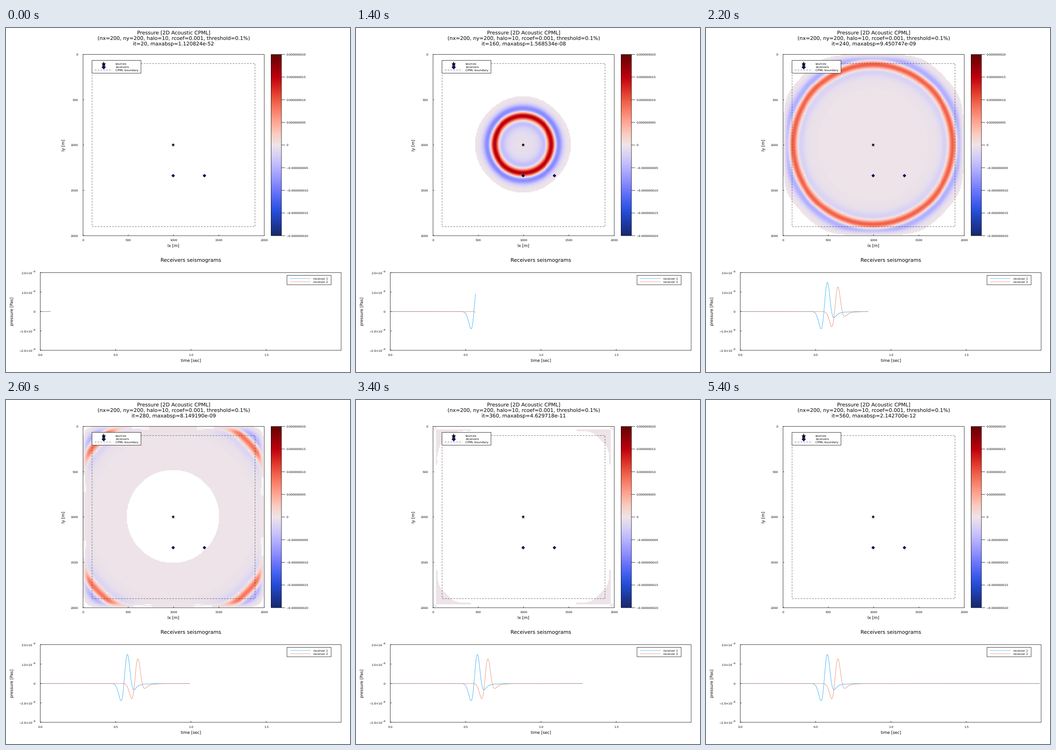
A matplotlib script for the animation above (5600 ms loop, 748 by 749 pixels).

```python
import numpy as np
import matplotlib.pyplot as plt
from matplotlib.animation import FuncAnimation
from matplotlib.colors import LinearSegmentedColormap
from matplotlib.patches import Rectangle

W, H, DPI = 748, 749, 100
PX = 72 / DPI
plt.rcParams.update({"font.family": "DejaVu Sans", "text.hinting": "none"})

# Acoustic wave equation on a square grid with CPML edges
N, HALO, VEL, FREQ, RCOEF = 200, 10, 2000.0, 10.0, 0.001
SIZE, T0 = 2000.0, 0.4
DX = SIZE / (N - 1)
DT = DX / (np.sqrt(2) * VEL)
STEP, FRAMES = 20, 28
SRC, FAR = 99, 133
CLIM, CUT = 2e-8, 2e-11


def damping(pos):
    """CPML coefficients (a, b) at grid positions, as a column."""
    d = np.maximum(np.maximum(HALO - pos, pos - (N - 1 - HALO)), 0) / HALO
    damp = -3 * VEL * np.log(RCOEF) / (2 * HALO * DX) * d ** 2
    alpha = np.pi * FREQ * (1 - d)
    b = np.exp(-(damp + alpha) * DT)
    a = damp * (b - 1) / (damp + alpha)
    return a[:, None], b[:, None]


A_HALF, B_HALF = damping(np.arange(N - 1) + 0.5)
A_NODE, B_NODE = damping(np.arange(1, N - 1) * 1.0)


def second_diff(p, psi, xi):
    """Damped second derivative along the first axis."""
    grad = np.diff(p, axis=0) / DX
    psi *= B_HALF
    psi += A_HALF * grad
    curve = np.diff(grad + psi, axis=0) / DX
    xi *= B_NODE
    xi += A_NODE * curve
    return (curve + xi)[:, 1:-1]


def ricker(t):
    x = (np.pi * FREQ * (t - T0)) ** 2
    return (1 - 2 * x) * np.exp(-x)


def simulate():
    old, cur = np.zeros((N, N)), np.zeros((N, N))
    mem_x, mem_y = ([np.zeros((N - 1, N)), np.zeros((N - 2, N))] for _ in range(2))
    inner = np.s_[1:-1, 1:-1]
    snaps, traces = [], []
    for n in range(STEP * FRAMES):
        new = np.zeros((N, N))
        lap = second_diff(cur, *mem_x) + second_diff(cur.T, *mem_y).T
        new[inner] = 2 * cur[inner] - old[inner] + (VEL * DT) ** 2 * lap
        new[SRC, SRC] += ricker(n * DT) * (DT / DX) ** 2
        old, cur = cur, new
        traces.append((cur[SRC, FAR], cur[FAR, FAR]))
        if (n + 1) % STEP == 0:
            snaps.append(cur.T.copy())
    return snaps, np.array(traces).T


snaps, traces = simulate()

STOPS = [(24, 40, 110), (30, 57, 160), (36, 76, 212), (68, 97, 240),
         (112, 120, 252), (150, 150, 255), (184, 180, 255), (213, 207, 247),
         (238, 228, 232), (250, 203, 191), (255, 166, 148), (250, 128, 107),
         (236, 88, 66), (218, 42, 34), (190, 0, 14), (143, 2, 8), (100, 4, 2)]
cmap = LinearSegmentedColormap.from_list("bwr", np.array(STOPS) / 255, 256)

# Everything is placed in stage pixels, y pointing down
fig = plt.figure(figsize=(W / DPI, H / DPI), dpi=DPI, facecolor="white")
ax = fig.add_axes([0, 0, 1, 1])
ax.axis("off")

BIG, MID, SMALL, SUP = 11.11, 8.73, 6.35, 4.6
FRAME, THIN = 0.75, 0.6
NAVY = "#0000a0"
L, R, T, B = 167.4, 561.4, 57.5, 452.2
L2, R2, T2, B2 = 74.5, 728.8, 532.7, 701.8
MID2, UNIT2, SEC = (T2 + B2) / 2, (B2 - T2) / 4, 327.6


def mx(m):
    return L + m * (R - L) / SIZE


def my(m):
    return T + m * (B - T) / SIZE


def label(x, y, s, size=SMALL, ha="center"):
    """Text whose capitals are centred on y."""
    return ax.text(x, y + 0.3645 * size, s, fontsize=size * PX, ha=ha,
                   va="baseline", color="black", zorder=8)


def side_label(x, y, s):
    ax.text(x, y, s, fontsize=MID * PX, rotation=90, ha="center", va="center")


def line(xs, ys, color="black", lw=FRAME, z=5, **kw):
    return ax.plot(xs, ys, color=color, lw=lw * PX, zorder=z, snap=False, **kw)[0]


def box(l, t, r, b, fill="none", z=5):
    ax.add_patch(Rectangle((l, t), r - l, b - t, fc=fill, ec="black",
                           lw=FRAME * PX, zorder=z, snap=False))


def picture(data, l, t, r, b, clip):
    im = ax.imshow(data, cmap=cmap, vmin=-CLIM, vmax=CLIM, aspect="auto",
                   extent=(l, r, b, t), interpolation="nearest", zorder=1)
    cl, ct, cr, cb = clip
    im.set_clip_path(Rectangle((cl, ct), cr - cl, cb - ct, transform=ax.transData))
    return im


def marker(x, y, kind, size, fill, z=6):
    ax.plot([x], [y], kind, ms=size * PX, mfc=fill, mec="black",
            mew=0.8 * PX, zorder=z, snap=False)


# Pressure map
half = DX / 2
field = picture(np.full((N, N), np.nan), mx(-half), my(-half),
                mx(SIZE + half), my(SIZE + half), (L, T, R, B))
box(L, T, R, B)
for m in range(0, 2001, 500):
    label(mx(m), 461.8, str(m))
    label(156.7, my(m), str(m), ha="right")
    line([mx(m)] * 2, [B, B - 2.2])
    line([L, L + 2.2], [my(m)] * 2)
label(364.3, 475, "lx [m]", MID)
side_label(126, 255, "ly [m]")

DASH = dict(color="#222222", lw=THIN, linestyle=(0, (6.2, 4.2)),
            dash_capstyle="butt")
lo, hi = 100, 1900
line([mx(v) for v in (lo, hi, hi, lo, lo)],
     [my(v) for v in (lo, lo, hi, hi, lo)], z=3, **DASH)

marker(mx(SRC * DX), my(SRC * DX), "*", 6.8, "black")
for ix in (SRC, FAR):
    marker(mx(ix * DX), my(FAR * DX), "D", 4.6, NAVY)

box(187, 70.5, 293.5, 98.3, "white", 6)
marker(212.4, 77.5, "*", 9.4, "black", 7)
marker(212.4, 84.6, "D", 6.1, NAVY, 7)
line([193, 231], [91.6] * 2, z=7, **DASH)
for k, name in enumerate(("sources", "receivers", "CPML boundary")):
    label(238, 77.7 + 7 * k, name, ha="left")

# Colour bar
bar = (576.5, T, 599, B)
picture(np.linspace(CLIM, -CLIM, 256)[:, None], *bar, bar)
box(*bar)
for k in range(-4, 5):
    y = (T + B) / 2 - k * (B - T) / 8
    line([599, 606.5], [y, y])
    text = f"{k * 5e-9:.9f}".replace("-", "\u2212") if k else "0"
    label(609.5, y, text, ha="left")

# Titles
label(364.4, 9.9, "Pressure [2D Acoustic CPML]", BIG)
label(364.4, 21.9, "(nx=200, ny=200, halo=10, rcoef=0.001, threshold=0.1%)", BIG)
status = label(364.4, 33.9, "", BIG)
label(401.6, 505, "Receivers seismograms", BIG)

# Seismograms
box(L2, T2, R2, B2)
for k in range(4):
    x = L2 + k * SEC / 2
    label(x, 711.3, f"{k / 2:.1f}")
    line([x, x], [B2, B2 - 2.6])
for k in range(-2, 3):
    y = MID2 - k * UNIT2
    line([L2, L2 + 2.6], [y, y])
    if k:
        base = f"{k:.1f}\u00d710".replace("-", "\u2212")
        label(57.3, y + 1.2, base, ha="right")
        label(57.2, y - 2.2, "\u22128", SUP, "left")
    else:
        label(64, y, "0", ha="right")
label(402, 724.3, "time [sec]", MID)
side_label(14, 617, "pressure [Pas]")

COLORS = ("#009afa", "#e36f47")
times = L2 + np.arange(STEP * FRAMES) * DT * SEC
curves = [line([], [], c, THIN + 0.1, 4) for c in COLORS]
box(611, 538.5, 707, 559, "white", 6)
for k, c in enumerate(COLORS):
    y = 545.4 + 6.9 * k
    line([618, 662], [y, y], c, THIN, 7)
    label(668.5, y, f"receiver {k + 1}", ha="left")

ax.set_xlim(0, W)
ax.set_ylim(H, 0)


def update(i):
    p, it = snaps[i], STEP * (i + 1)
    size = np.abs(p)
    field.set_data(np.ma.masked_where(size < CUT, p))
    status.set_text(f"it={it}, maxabsp={size.max():.6e}")
    for curve, trace in zip(curves, traces):
        curve.set_data(times[:it], MID2 - trace[:it] / 1e-8 * UNIT2)
    return [field, status, *curves]


anim = FuncAnimation(fig, update, frames=FRAMES, interval=200, repeat=True,
                     repeat_delay=0, blit=False)
plt.show()
```
